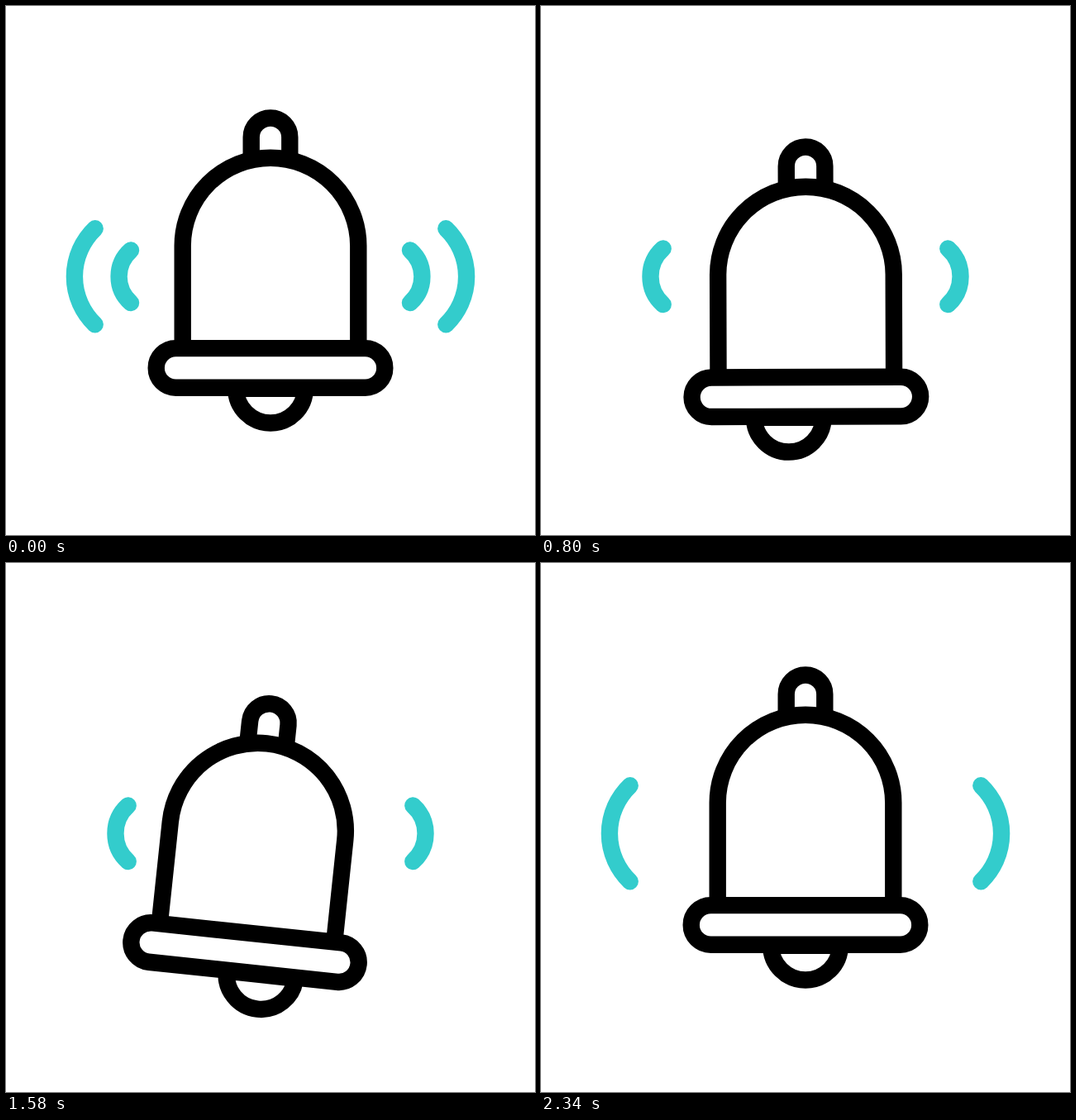
Recreate the animation shown at these times as an HTML page. Size 640 px wide and 640 px high, loop 2400 ms.

```html
<!DOCTYPE html>
<html lang="en">
<head>
<meta charset="utf-8">
<title>Ringing bell</title>
<style>
  html, body { margin: 0; width: 100%; height: 100%; overflow: hidden; background: #fff; }
  svg { display: block; width: 100vw; height: 100vh; }
</style>
</head>
<body>
<svg viewBox="0 0 640 640" fill="none" stroke-width="20.4">
  <path id="waves" stroke="#33cccc" stroke-linecap="round"/>
  <g id="bell" stroke="#000">
    <path d="M296.7 186V158.8a23.3 23.3 0 0 1 46.6 0V186"/>
    <path d="M213.7 414V290a106.3 106.3 0 0 1 212.6 0V414"/>
    <rect x="181.7" y="414.1" width="276.6" height="47.6" rx="23.8"/>
    <path id="clapper" d="M278.2 462.7a41.8 41.8 0 0 0 83.6 0z"/>
  </g>
</svg>
<script>
const LOOP = 2400, STEP = 20, LAST = 117, WAVE = 13;
const TILT = 6.06, SLIDE = 30.5, DROP = 35;

const [waves, bell, clapper] = ['waves', 'bell', 'clapper'].map(id => document.getElementById(id));

const clamp = x => Math.min(1, Math.max(0, x));
const smooth = x => x * x * (3 - 2 * x);
const ease = (t, from, to) => smooth(clamp((t - from) / (to - from)));

// Rises to 1 at `rise`, turns at `turn` and then every `gap`, and comes to rest at `end`.
function swing(t, { rise, turn, gap, turns, end }) {
  let value = ease(t, 0, rise) - 2 * ease(t, rise, turn);
  let sign = -1, at = turn;
  for (let i = 1; i < turns; i++) {
    value -= 2 * sign * ease(t, at, at + gap);
    sign = -sign;
    at += gap;
  }
  return value - sign * ease(t, at, end);
}

const tilt = { rise: 272, turn: 471, gap: 218, turns: 6, end: 2027 };
const slide = { rise: 212, turn: 407, gap: 224.2, turns: 7, end: 2090 };

// One ripple arc at progress p; side is -1 on the left, 1 on the right.
function ripple(side, p) {
  const x = 320 + side * (169 + 43.3 * p);
  const half = 31.8 + 26.2 * p;
  const sag = 14.4 + 10.4 * p;
  const r = (half * half + sag * sag) / (2 * sag);
  return `M${x} ${327.3 - half}a${r} ${r} 0 0 ${side > 0 ? 1 : 0} 0 ${2 * half}`;
}

function wavePath(n) {
  const p = (n % WAVE) / WAVE;
  const rings = p > 0 ? [p] : n === LAST ? [1] : [0, 1];
  return rings.map(q => ripple(-1, q) + ripple(1, q)).join('');
}

function draw(time) {
  const n = Math.min(LAST, Math.floor((time % LOOP) / STEP + 0.001));
  const t = n * STEP;
  const drop = DROP * (ease(t, 0, tilt.rise) - ease(t, 1561, tilt.end));
  bell.setAttribute('transform', `translate(0 ${drop}) rotate(${TILT * swing(t, tilt)} 320 143)`);
  clapper.setAttribute('transform', `translate(${SLIDE * swing(t, slide)} 0)`);
  waves.setAttribute('d', wavePath(n));
}

const start = performance.now();
function tick() {
  draw(Math.max(0, performance.now() - start));
  requestAnimationFrame(tick);
}
draw(0);
requestAnimationFrame(tick);
</script>
</body>
</html>
```
